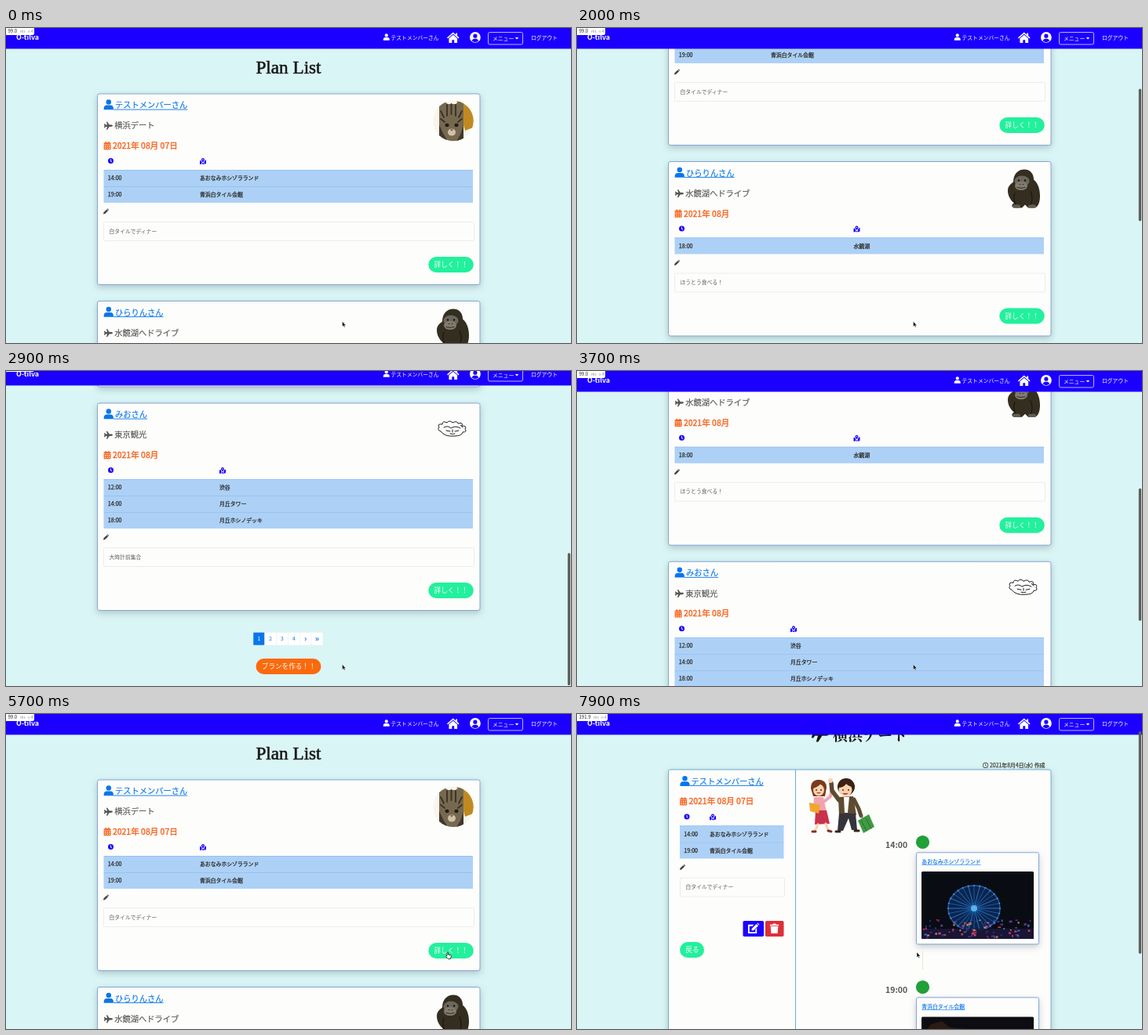
Write an HTML page that moves like this. It is 720x402 px and loops after 8 s.

```html
<!DOCTYPE html>
<html lang="ja">
<head>
<meta charset="utf-8">
<title>Plan List</title>
<style>
html, body { margin: 0; width: 100%; height: 100%; overflow: hidden; background: #daf5f6; }
svg { display: block; width: 720px; height: 402px; }
text { font-family: "Noto Sans CJK JP", "Noto Sans CJK", "Noto Sans", sans-serif; white-space: pre; }
.serif { font-family: "Liberation Serif", "Noto Serif CJK JP", "Noto Sans CJK JP", serif; }
.soft { filter: drop-shadow(0 3px 4px rgba(60, 75, 80, .28)); }
</style>
</head>
<body>
<svg id="stage" viewBox="0 0 720 402" xmlns="http://www.w3.org/2000/svg"></svg>
<script>
const LOOP = 8000, STEP = 100;
const NAVY = '#1b00ff', LINK = '#0876ec', ORANGE = '#f7621c', GREEN = '#22f09c', LEAF = '#20a038',
      INK = '#2b2b2b', GREY = '#565654', PAPER = '#fdfdfc', ROW = '#add1f6', EDGE = '#83a6d6';
const LIST_MAX = 543, DETAIL_AT = 6300, DETAIL_SHIFT = 28;

// Icons on a 16 x 16 grid
const ICONS = {
  user: 'M8 0a4 4 0 1 1 0 8a4 4 0 0 1 0-8zM.5 16v-2.5c0-3 2-4.7 4.5-4.7h6c2.5 0 4.5 1.7 4.5 4.7V16z',
  plane: 'M16 8c0-1-1.5-1.6-3-1.6h-3L6.5 1H4.7l1.6 5.4H3.6L2.2 4.6H.6L1.4 8l-.8 3.4h1.6l1.4-1.8h2.7L4.7 15h1.8L10 9.6h3c1.5 0 3-.6 3-1.6z',
  calendar: 'M1 4a2 2 0 0 1 2-2h1V0h2v2h4V0h2v2h1a2 2 0 0 1 2 2v1H1zM1 6h14v9a1 1 0 0 1-1 1H2a1 1 0 0 1-1-1zM3 8h2v2H3zM7 8h2v2H7zM11 8h2v2h-2zM3 12h2v2H3zM7 12h2v2H7zM11 12h2v2h-2z',
  clock: 'M8 0a8 8 0 1 1 0 16a8 8 0 0 1 0-16zM7 3v6l4 3 1-1.5-3-2.3V3z',
  ring: 'M8 0a8 8 0 1 1 0 16a8 8 0 0 1 0-16zM8 2a6 6 0 1 0 0 12a6 6 0 0 0 0-12zM7 4h2v4l2.5 2-1 1.4L7 9z',
  map: 'M8 0a4 4 0 0 1 4 4c0 2-4 7-4 7s-4-5-4-7a4 4 0 0 1 4-4zM8 2.5a1.5 1.5 0 1 0 0 3a1.5 1.5 0 0 0 0-3zM0 7l3-1.2 2 3.8V15L0 16zM6 11.5l2 2 2-2V16l-4-1zM11 10l2-4 3-1v9l-5 2z',
  pencil: 'M0 16l1-5L10 2l4 4-9 9zM11 1l1-1h1l3 3v1l-1 1z',
  home: 'M8 1L0 8l1 1.2L8 3.2l7 6L16 8l-2.5-2.2V2h-2v2zM8 4.5L2.5 9v6h4v-4h3v4h4V9z',
  account: 'M8 0a8 8 0 1 1 0 16a8 8 0 0 1 0-16zM8 3a3 3 0 1 0 0 6a3 3 0 0 0 0-6zM3 13c1-2 2-3 3.5-3h3c1.5 0 2.5 1 3.5 3c-3 2.7-7 2.7-10 0z',
  edit: 'M1 3h8L7 5H3v8h8V9.5l2-2V15H1zM6 8.5L12.5 2 15 4.5 8.5 11H6zM13.2 1.3l.8-.8L16.5 3l-.8.8z',
  trash: 'M1 2h4l1-1.5h4L11 2h4v2H1zM2 5h12l-1 11H3z'
};

const icon = (name, x, y, size, fill) =>
  `<path d="${ICONS[name]}" fill="${fill}" fill-rule="evenodd" transform="translate(${x} ${y}) scale(${size / 16})"/>`;
const text = (x, y, size, str, fill = INK, extra = '') =>
  `<text x="${x}" y="${y}" font-size="${size}" fill="${fill}" ${extra}>${str}</text>`;
const rect = (x, y, w, h, fill, extra = '') =>
  `<rect x="${x}" y="${y}" width="${w}" height="${h}" fill="${fill}" ${extra}/>`;
const circle = (x, y, r, fill, extra = '') =>
  `<circle cx="${x}" cy="${y}" r="${r}" fill="${fill}" ${extra}/>`;
const oval = (x, y, rx, ry, fill, extra = '') =>
  `<ellipse cx="${x}" cy="${y}" rx="${rx}" ry="${ry}" fill="${fill}" ${extra}/>`;
const path = (d, fill, extra = '') => `<path d="${d}" fill="${fill}" ${extra}/>`;
const line = (d, stroke, width = 1) =>
  `<path d="${d}" fill="none" stroke="${stroke}" stroke-width="${width}" stroke-linecap="round" stroke-linejoin="round"/>`;
const link = (x, y, size, str, pad = 0) => text(x, y, size, str, LINK, firm(LINK, .15)) +
  rect(x - pad, y + size * .14, str.length * size + pad, size > 8 ? .9 : .6, LINK);
const pill = (x, y, w, label, fill, id = '') =>
  rect(x, y, w, 20, fill, `rx="10" ${id}`) + text(x + 7.3, y + 13.2, 8.6, label, '#fff');
// Medium weight: the regular face with a thin outline
const firm = (color, width = .25) => `stroke="${color}" stroke-width="${width}"`;

function tableRows(x, y, w, col, rows) {
  return icon('clock', x + 5.5, y - 15, 7, NAVY) + icon('map', col, y - 15, 8, NAVY) +
    rows.map(([time, place], i) => {
      const top = y + i * 21;
      return rect(x, top, w, 21, ROW) + rect(x, top, w, .8, '#93bdee') +
        text(x + 5.3, top + 13.2, 7.1, time, INK, firm(INK)) +
        text(col, top + 13.2, 6.85, place, INK, firm(INK));
    }).join('');
}

const memo = (x, y, w, str) =>
  icon('pencil', x, y - 16.5, 7, '#444') +
  rect(x + .5, y + .5, w, 24, PAPER, 'stroke="#ececea" rx="1"') +
  text(x + 7.5, y + 14.5, 6.8, str, '#5e5e5a');

const dateLine = (x, y, str) =>
  icon('calendar', x, y - 9, 10.2, ORANGE) + text(x + 11.9, y, 10.5, str, ORANGE, firm(ORANGE, .35));

function planCard(y, plan) {
  const rowsEnd = 97 + plan.rows.length * 21;
  return `<g transform="translate(0 ${y})">` +
    rect(116.5, 0, 487.5, rowsEnd + 104.5, PAPER, `rx="2.5" stroke="${EDGE}" class="soft"`) +
    icon('user', 124.3, 7.3, 13, LINK) + link(139, 18.2, 10.25, plan.user, 2) +
    icon('plane', 124.5, 35, 11.5, GREY) + text(138.3, 44.3, 10.25, plan.title, GREY, firm(GREY, .15)) +
    dateLine(124, 70, plan.date) +
    tableRows(124.5, 97, 470.5, plan.col, plan.rows) +
    memo(124, rowsEnd + 24, 472, plan.memo) +
    pill(538.3, rowsEnd + 69, 57.5, '詳しく！！', GREEN, plan.id || '') +
    plan.avatar + '</g>';
}

const catPhoto = '<g clip-path="url(#round)">' +
  rect(543, 8, 54, 54, '#f8f5ec') + path('M574 8h24v34l-13 5z', '#c08a22') +
  path('M552 10l4-2 7 5h10l6-5 4 2v52h-31z', '#77694f') +
  path('M552 40l6 12 6 10h-12zM583 40l-4 12-6 10h10z', '#40382c') +
  line('M562 14v14M567.5 13v13M573 14v14M554 22l4 8M581 22l-4 8M554 32l5 4M581 32l-5 4', '#3a3228', 1.9) +
  oval(562, 40, 2.6, 2.2, '#1f1d18') + oval(574, 40, 2.6, 2.2, '#1f1d18') +
  oval(568, 49, 5, 4.5, '#cfc2a8') + path('M566 45h4l-2 3z', '#8d5a4c') + '</g>';

const gorilla = path('M556 26c0-10 6-16 14-16s12 6 12 13c6 5 8 13 8 21 0 7-2 13-6 15h-9l-4-4-4 4h-10c-4-1-3-5 0-6-5-4-8-10-8-16 0-5 3-8 7-11z', '#342e20') +
  oval(567, 25, 9.5, 7, '#6c675c') + oval(566, 31, 8, 5.5, '#827c6e') +
  circle(563, 24, 1.2, '#111') + circle(571, 24, 1.2, '#111') +
  line('M561 33q5 2 10 0M564 29h1M568 29h1', '#25221a', .9) +
  line('M558 40q-3 8 1 14M578 38q4 9 0 18', '#1a170f', 1.2) +
  oval(560, 57, 5, 2.2, '#625d50') + oval(580, 57, 5, 2.2, '#625d50');

const sketch = path('M554 36q-5-2-2-5q-3-5 4-4q0-5 6-2q3-4 7 0q6-3 7 1q7-2 5 3q7 0 4 4q3 4-3 4q-1 5-11 5q-12 1-17-6z', '#fff',
    'stroke="#1b1b1b" stroke-width="1"') +
  line('M558 31q5-3 9 1q6-4 12 0M561 35l5 1M572 36l5-1M569 34v3M566 39q4 1 6 0M579 28l3 3', '#1b1b1b', 1);

const plans = [
  { user: 'テストメンバーさん', title: '横浜デート', date: '2021年 08月 07日', col: 247,
    rows: [['14:00', 'あおなみホシゾラランド'], ['19:00', '青浜白タイル会館']],
    memo: '白タイルでディナー', avatar: catPhoto, id: 'id="more"' },
  { user: 'ひらりんさん', title: '水鏡湖へドライブ', date: '2021年 08月', col: 352.5,
    rows: [['18:00', '水鏡湖']], memo: 'ほうとう食べる！', avatar: gorilla },
  { user: 'みおさん', title: '東京観光', date: '2021年 08月', col: 272,
    rows: [['12:00', '渋谷'], ['14:00', '月丘タワー'], ['18:00', '月丘ホシノデッキ']],
    memo: '大時計前集合', avatar: sketch }
];

function listPage() {
  const pages = ['1', '2', '3', '4', '›', '»'].map((p, i) =>
    rect(315 + i * 14.8, 884.5, 14.8, 16.5, i ? '#fff' : LINK, 'stroke="#e8eef0" stroke-width=".5"') +
    text(322.4 + i * 14.8, i > 3 ? 895.8 : 895.3, i > 3 ? 10 : 6.8, p, i ? LINK : '#fff',
      `text-anchor="middle" ${i > 3 ? 'font-weight="700"' : ''}`)).join('');
  return text(360, 58, 23.2, 'Plan List', '#161616', `class="serif" text-anchor="middle" ${firm('#161616', .55)}`) +
    planCard(84, plans[0]) + planCard(348.5, plans[1]) + planCard(592, plans[2]) +
    pages + pill(318.5, 918, 83, 'プランを作る！！', '#fb6a0c');
}

function couple() {
  const skin = '#fbd2ac', brown = '#7a3b1c', dark = '#3a2214';
  return path('M298 95q0-11 10-11t10 10l-2 11h-15z', brown) + oval(308, 97, 7, 7.5, skin) +
    path('M300 95q8-2 10-6 5 2 6 7l1-5q-3-8-10-7-8 1-7 11z', brown) +
    line('M316 111l7-6 1-6', '#f2a4ae', 4) + circle(324, 98, 2.2, skin) +
    path('M302 106h12l4 19h-17z', '#f2a4ae') + path('M304 123h14l4 17-19 1z', '#c8324b') +
    path('M296 113l14 3-2 11-11-3z', '#f0a82c') +
    line('M307 141l-3 7M317 140l3 8', skin, 3) + line('M304 150h-4M320 149l4 1', '#80312b', 3) +
    line('M334 110l-9-12-1-10', '#5d4a30', 5.5) + circle(323, 85, 3, skin) +
    path('M333 106l19-1 4 24h-22z', '#5d4a30') + path('M340 106h7l-2 20h-4z', '#fbfbf8') +
    path('M334 127h21l2 21h-7l-4-15-7 16h-7z', '#34343a') +
    line('M353 109l6 12 3 9', '#5d4a30', 5) +
    circle(343, 93, 11, dark) + oval(342, 97, 8.5, 8, skin) +
    path('M333 94q7 0 10-5 4 4 9 4l-1-6q-7-6-14-3-5 3-4 10z', dark) +
    [305, 311, 339, 346].map(x => circle(x, 97, .9, '#222')).join('') +
    path('M305 100q3 3 6 0zM338 101q4 4 8 0z', '#c23a30') +
    line('M335 150h-5M354 149h5', dark, 3) + line('M362 130l4 5', '#666', 1.2) +
    path('M358 136l14-8 7 16-14 8z', '#3f9a43') + line('M362 136l7 13M368 133l7 13', '#28702e', 1);
}

function seeded(seed) {
  return () => (seed = (seed * 16807) % 2147483647) / 2147483647;
}

function wheelPhoto() {
  const rnd = seeded(77), cx = 506, cy = 248, rx = 33, ry = 29;
  const lights = ['#b8357e', '#6a3fb0', '#2f7fd0', '#d4506a', '#3a2f90', '#d8a060'];
  let out = rect(439, 201, 143, 86, '#0a0c14', 'rx="1.5"') +
    oval(cx, cy, rx, ry, '#0d2f66', 'opacity=".7" stroke="#2f7fd8" stroke-width="1.4"');
  for (let i = 0; i < 28; i++) {
    const a = i * Math.PI / 14, x = cx + rx * Math.cos(a), y = cy + ry * Math.sin(a);
    out += line(`M${cx} ${cy}L${x.toFixed(1)} ${y.toFixed(1)}`, i % 2 ? '#1c5cb4' : '#2582c8', .9) +
      circle(x.toFixed(1), y.toFixed(1), 1.1, '#3f93e0');
  }
  out += circle(cx, cy, 4, '#58b4e8') + rect(439, 274, 143, 13, '#1b1738', 'opacity=".9"');
  for (let i = 0; i < 90; i++) {
    const y = 262 + rnd() * 22;
    out += rect((440 + rnd() * 138).toFixed(1), y.toFixed(1), (1 + rnd() * 3).toFixed(1), (1 + rnd() * 2).toFixed(1),
      lights[i % 6], 'opacity=".85"');
  }
  return out;
}

function stop(y, time, place, photo) {
  return text(393, y + 7.5, 10.5, time, GREY, 'font-weight="700"') + circle(440.5, y, 8.6, LEAF) +
    rect(432.5, y + 13.3, 156, 117, PAPER, `rx="2" stroke="${EDGE}" class="soft"`) +
    link(439.3, y + 27.7, 6.85, place) + photo;
}

function detailPage() {
  const [plan] = plans;
  const hall = rect(439, 386.5, 143, 86, '#0c0c12', 'rx="1.5"') +
    path('M439 412l12-16 14-4 10 8 107 10v62H439z', '#2a1c12') + rect(452, 420, 120, 14, '#a8682c');
  return icon('plane', 298, 14, 23, '#161616') + text(326, 34, 19, plan.title, '#161616', 'class="serif" font-weight="700"') +
    icon('ring', 517, 61.8, 7.2, GREY) + text(526, 68, 6.9, '2021年8月4日(水) 作成', '#44443c', firm('#44443c')) +
    rect(116.5, 71, 487.5, 445, PAPER, 'rx="2" stroke="#70aed0" class="soft"') + rect(278, 71, 1, 445, '#64aed0') +
    icon('user', 131, 79, 13, LINK) + link(145.5, 89.5, 10.25, plan.user, 2) +
    dateLine(130.5, 115.2, plan.date) +
    tableRows(131, 142.5, 132.5, 169, plan.rows) +
    memo(131, 208.5, 133, plan.memo) +
    rect(211.5, 264, 26.5, 20, NAVY, 'rx="1.8"') + icon('edit', 217, 266, 15, '#fff') +
    rect(240, 264, 23.5, 20, '#dc3038', 'rx="1.8"') + icon('trash', 245, 267, 13, '#fff') +
    pill(131, 291, 31, '戻る', GREEN) + couple() +
    rect(440, 303, .8, 23, '#e2e2c0') +
    stop(163.5, '14:00', plan.rows[0][1], wheelPhoto()) +
    stop(348.5, '19:00', plan.rows[1][1], hall);
}

const navBar = rect(0, -40, 720, 40, '#fff') + rect(0, 0, 720, 26.5, NAVY) +
  text(13, 15, 8.8, 'O-tilva', '#fff', 'font-weight="700"') +
  icon('user', 480.5, 7.3, 8.5, '#fff') + text(490.5, 14.5, 6.8, plans[0].user, '#fff') +
  icon('home', 562, 4.5, 15.5, '#fff') + icon('account', 591, 5, 13.8, '#fff') +
  rect(614.5, 5.5, 44, 15.5, 'none', 'rx="2" stroke="#e2e0ff" stroke-width=".8"') +
  text(620, 15.5, 6.8, 'メニュー', '#fff') + path('M648.8 12h4.4l-2.2 2.4z', '#fff') +
  text(669, 14.5, 6.8, 'ログアウト', '#fff') +
  `<g id="badge">${path('M0-1H36V6.5a2.5 2.5 0 0 1-2.5 2.5H0z', '#fff', 'id="tag"')}` +
  text(2.5, 6.4, 6, '99.0', '#222', 'id="load"') + text(18, 6.4, 4.8, 'ms  ×4', '#888', 'id="unit"') + '</g>';

const stage = document.getElementById('stage');
stage.innerHTML = `<defs><clipPath id="round">${circle(570, 34.5, 25.7, '#000')}</clipPath></defs>` +
  rect(0, 0, 720, 402, '#daf5f6') +
  `<g id="list">${listPage()}</g><g id="detail">${detailPage()}</g><g id="nav">${navBar}</g>` +
  rect(715.8, 2, 3.4, 169, '#5d5d58', 'id="bar" rx="1.7"') +
  '<g id="pointer">' +
  path('M0 0V6.6L1.5 5.2 2.6 7.5 3.6 7 2.6 4.9H4.6z', '#111', 'id="arrow" stroke="#fff" stroke-width=".4"') +
  path('M1.5 5V1q.8-1 1.5 0v2.500l3.300.8q.7.5.5 1.7L6 9H2.7L0 5.8q.3-1 1.5-.8z', '#fff', 'id="hand" stroke="#111" stroke-width=".8"') +
  '</g>';

const el = {};
stage.querySelectorAll('[id]').forEach(n => { el[n.id] = n; });
const set = (n, name, value) => n.setAttribute(name, value);
const show = (n, on) => set(n, 'display', on ? 'inline' : 'none');
const move = (n, x, y) => set(n, 'transform', `translate(${x} ${y})`);
const clamp = (v, lo, hi) => Math.min(hi, Math.max(lo, v));
const ease = (t, from, to) => {
  const p = clamp((t - from) / (to - from), 0, 1);
  return p * p * (3 - 2 * p);
};

// Monotone cubic through [time, value] points
function track(pts, t) {
  const last = pts.length - 1;
  if (t <= pts[0][0]) return pts[0][1];
  if (t >= pts[last][0]) return pts[last][1];
  const slope = i => (pts[i + 1][1] - pts[i][1]) / (pts[i + 1][0] - pts[i][0]);
  const tangent = i => {
    if (i === 0 || i === last) return 0;
    const a = slope(i - 1), b = slope(i);
    return a * b <= 0 ? 0 : 2 * a * b / (a + b);
  };
  const i = pts.findIndex(p => p[0] > t) - 1;
  const h = pts[i + 1][0] - pts[i][0], u = (t - pts[i][0]) / h, v = 1 - u;
  return pts[i][1] * v * v * (1 + 2 * u) + pts[i + 1][1] * u * u * (3 - 2 * u) +
    h * u * v * (v * tangent(i) - u * tangent(i + 1));
}

const listScroll = [[900, 0], [1400, 74], [1700, 124], [2000, 178], [2500, 400], [2800, 546], [2900, 551],
  [3150, 544], [3300, 543], [3500, 490], [3900, 180], [4200, 3], [4300, -3], [4600, 0]];
const detailScroll = [[7100, 0], [7500, 13], [7900, DETAIL_SHIFT]];

function draw(t) {
  const detail = t >= DETAIL_AT;
  const s = track(detail ? detailScroll : listScroll, t);
  const base = clamp(s, 0, LIST_MAX);
  show(el.list, !detail);
  show(el.detail, detail);
  move(el.list, 0, -s);
  move(el.detail, 0, DETAIL_SHIFT - s);
  move(el.nav, 0, base - s);

  el.load.textContent = detail ? '191.9' : '99.0';
  set(el.unit, 'x', detail ? 21 : 18);
  set(el.tag, 'transform', `scale(${detail ? 39 / 36 : 1} 1)`);

  set(el.bar, 'y', detail ? 2 + .71 * s : 2 + .424 * base);
  set(el.bar, 'height', detail ? 284 : 169);
  set(el.bar, 'opacity', detail ? +(t >= 7200) : t < 1000 ? 0 : 1 - ease(t, 4900, 5200));

  const pressed = t >= 6000 && t < 6100;
  set(el.more, 'fill', pressed ? '#1bd98a' : GREEN);
  set(el.more, 'stroke', pressed ? '#a4f7d4' : 'none');
  set(el.more, 'stroke-width', 2);

  const go = ease(t, 4600, 5600), back = ease(t, 6300, 7100);
  move(el.pointer, 428.5 + 132 * go - 127.5 * back, 374.5 - 71 * go + .5 * back);
  const hand = t >= 5500 && t < DETAIL_AT;
  show(el.hand, hand);
  show(el.arrow, !hand);
}

function tick(now) {
  draw(Math.floor(now % LOOP / STEP) * STEP);
  requestAnimationFrame(tick);
}
draw(0);
requestAnimationFrame(tick);
</script>
</body>
</html>
```
